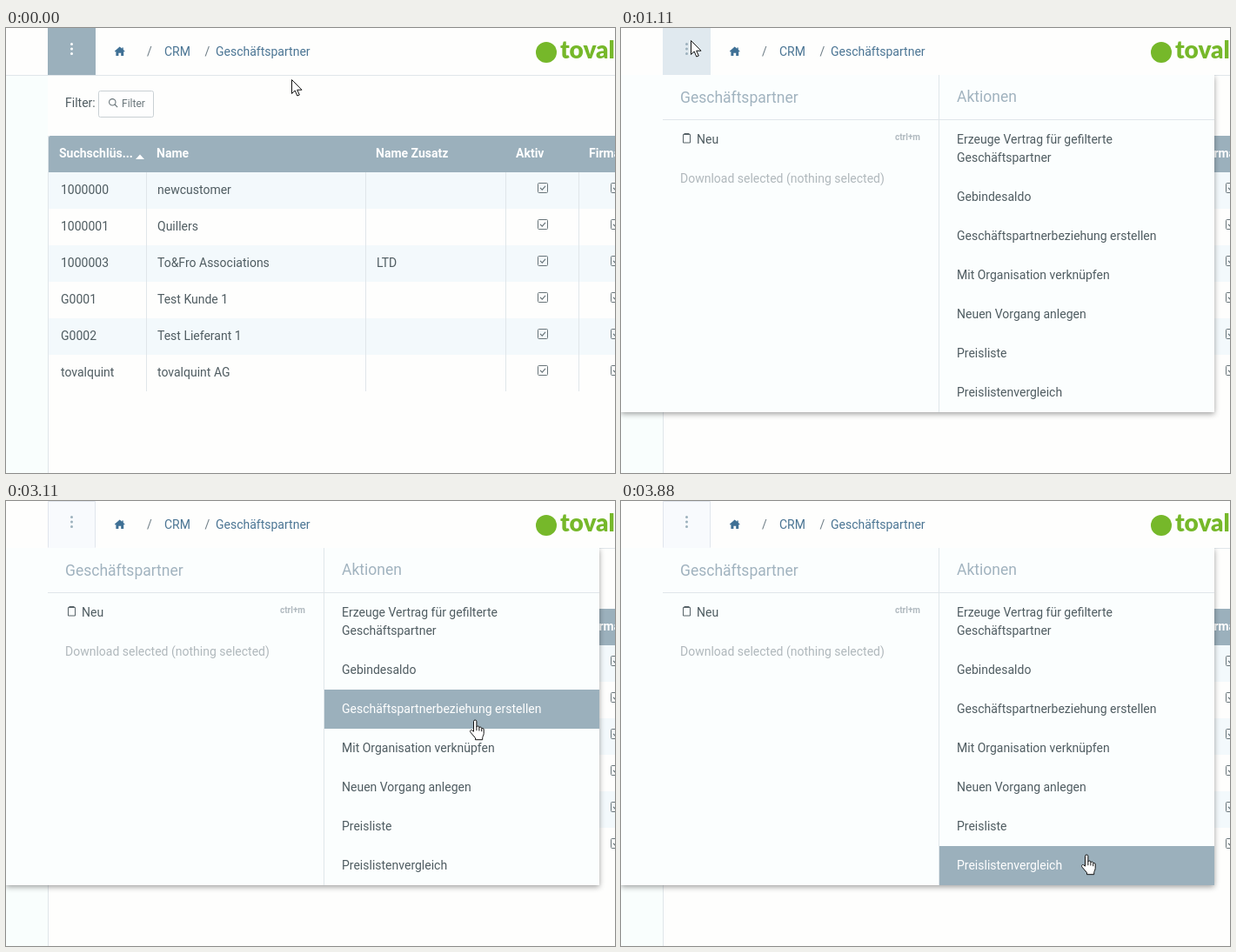
Write an HTML page that moves like this. It is 700x512 px and loops after 4000 ms.

```html
<!DOCTYPE html>
<html lang="de">
<head>
<meta charset="utf-8">
<title>Geschäftspartner</title>
<style>
html, body { margin: 0; width: 100%; height: 100%; overflow: hidden; background: #fefefd; }
svg { display: block; width: 100%; height: 100%; font: 14px Roboto, sans-serif; fill: #4f5c61; }
.line { fill: #e0e6ea; }
.th { fill: #fff; font-weight: 700; }
.crumb { fill: #4b7594; }
.title { fill: #a1b3bf; font-size: 17.5px; }
.brand { fill: #76b82a; font: 900 28px Lato, sans-serif; }
.thin { fill: none; stroke: #687479; }
.pointer { fill: #fff; stroke: #111; stroke-linejoin: round; }
rect { shape-rendering: crispEdges; }
</style>
</head>
<body>
<svg viewBox="0 0 700 512" preserveAspectRatio="none">
  <defs>
    <filter id="shadow" x="-5%" y="-5%" width="110%" height="112%">
      <feDropShadow dx="0" dy="2" stdDeviation="3" flood-color="#000" flood-opacity=".38"/>
    </filter>
    <clipPath id="below"><rect y="54" width="700" height="458"/></clipPath>
    <g id="check" class="thin">
      <rect x=".5" y=".5" width="11" height="11" rx="1" style="shape-rendering:auto"/>
      <path d="M3 5.8 5.3 8.2 9 3.8" stroke-width="1.2"/>
    </g>
  </defs>

  <rect width="700" height="512" fill="#fefefd"/>
  <rect y="55" width="48" height="457" fill="#f9fefd"/>
  <rect class="line" y="54" width="700" height="1"/>
  <rect class="line" x="48" y="124" width="1" height="388"/>

  <text x="68" y="91">Filter:</text>
  <rect x="106.5" y="72.5" width="63" height="30" rx="2" fill="#fefefe" stroke="#c9d0d4" style="shape-rendering:auto"/>
  <g class="thin" stroke-width="1.1"><circle cx="122.3" cy="85.3" r="3.7"/><path d="M125 88l3.2 3.2"/></g>
  <text x="133" y="91" font-size="12" fill="#6b777c">Filter</text>

  <g id="table"></g>

  <g id="menu">
    <g clip-path="url(#below)">
      <rect y="54" width="682" height="388" fill="#fbfefe" filter="url(#shadow)"/>
    </g>
    <rect class="line" x="48" y="105" width="634" height="1"/>
    <rect class="line" x="365" y="54" width="1" height="388"/>
    <text class="title" x="68" y="86">Geschäftspartner</text>
    <text class="title" x="386" y="85">Aktionen</text>
    <path id="star" fill="#9db1c0"/>
    <path class="thin" d="M71.5 122.5h8v9.5h-8zM72.5 121.5h6" style="stroke:#566267"/>
    <text x="87" y="133">Neu</text>
    <text x="315" y="129" font-size="10" font-weight="700" fill="#b1bac0">ctrl+m</text>
    <text x="68" y="178" fill="#b0b8bc">Download selected (nothing selected)</text>
    <g id="actions"></g>
  </g>

  <rect id="button" x="48" width="55" height="54"/>
  <path id="frame" d="M48.5 53.5V.5h54v53" fill="none" stroke="#e0e5ec"/>
  <g id="dots"><circle cx="75.5" cy="18.5" r="1.5"/><circle cx="75.5" cy="24" r="1.5"/><circle cx="75.5" cy="29.5" r="1.5"/></g>

  <path d="M130.7 21.5 125 26.6v.6h1.4V32h3v-3.3h2.8V32h3v-4.8h1.3v-.6l-1.7-1.5v-2.6h-1.4v1.3z" fill="#3f7095"/>
  <g fill="#6d7c85"><text x="162" y="32">/</text><text x="228.500" y="32">/</text></g>
  <text class="crumb" x="182" y="32">CRM</text>
  <text class="crumb" x="241" y="32">Geschäftspartner</text>
  <circle cx="621" cy="28" r="12" fill="#76b82a"/>
  <text class="brand" x="637" y="35">tovalquint</text>

  <path id="arrow" class="pointer" d="M.5.5V16.500l3.700-3.500 2.600 6 2.500-1-2.600-5.800H12z"/>
  <g id="hand" class="pointer">
    <path d="M5 14V2.500a1.700 1.700 0 0 1 3.400 0V9c0-1.600 2.800-1.600 3 0v.8c.2-1.400 2.700-1.200 2.800.4v.8c.4-1.200 2.500-1 2.500.8v4.500c0 2-1.500 3.500-1.500 5.200v2H7v-2L1.500 15c-1.400-2 .6-3.400 2-2.200z"/>
    <path d="M8.400 9v4M11.400 9.800v3.500M14.200 11v3" fill="none"/>
  </g>
</svg>
<script>
const $ = id => document.getElementById(id);
const rect = (x, y, w, h, attr) => `<rect x="${x}" y="${y}" width="${w}" height="${h}" ${attr}/>`;
const text = (x, y, s, attr = '') => `<text x="${x}" y="${y}" ${attr}>${s}</text>`;

const rows = [
  ['1000000', 'newcustomer'],
  ['1000001', 'Quillers'],
  ['1000003', 'To&amp;Fro Associations', 'LTD'],
  ['G0001', 'Test Kunde 1'],
  ['G0002', 'Test Lieferant 1'],
  ['tovalquint', 'tovalquint AG']
];
const heads = [[61, 'Suchschlüs...'], [173, 'Name'], [425, 'Name Zusatz'], [586, 'Aktiv'], [670, 'Firma']];
const cellX = [63, 174, 426];

function buildTable() {
  let out = '<path d="M49 166V126q0-2 2-2H700v42z" fill="#9bb0bc"/>';
  out += heads.map(([x, s]) => text(x, 149, s, 'class="th"')).join('');
  out += '<path d="M149 151l5-5.500 5 5.500z" fill="#fff"/>';
  rows.forEach((cells, i) => {
    const y = 166 + 42 * i;
    if (i % 2 === 0) out += rect(49, y, 651, 42, 'fill="#f3f9fc"');
    out += cells.map((s, j) => text(cellX[j], y + 25, s)).join('');
    out += [611, 695].map(x => `<use href="#check" x="${x}" y="${y + 12}"/>`).join('');
  });
  out += [161, 413, 574, 658].map(x => rect(x, 166, 1, 252, 'class="line"')).join('');
  $('table').innerHTML = out;
}

const actions = [
  ['Erzeuge Vertrag für gefilterte', 'Geschäftspartner'],
  ['Gebindesaldo'],
  ['Geschäftspartnerbeziehung erstellen'],
  ['Mit Organisation verknüpfen'],
  ['Neuen Vorgang anlegen'],
  ['Preisliste'],
  ['Preislistenvergleich']
];
const tops = actions.map((_, i) => i ? 127 + 45 * i : 106);
const bottoms = tops.map((_, i) => tops[i + 1] || 442);

function buildActions() {
  $('actions').innerHTML = actions.map((lines, i) => '<g>' +
    rect(366, tops[i], 316, bottoms[i] - tops[i], 'fill="#9bb0bc"') +
    lines.map((s, j) => text(386, tops[i] + 27 + 21 * j, s)).join('') + '</g>').join('');
}

function starPath(cx, cy, r) {
  const pts = Array.from({ length: 10 }, (_, i) => {
    const a = i * Math.PI / 5, d = i % 2 ? r * 0.45 : r;
    return (cx + d * Math.sin(a)).toFixed(1) + ' ' + (cy - d * Math.cos(a)).toFixed(1);
  });
  return 'M' + pts.join('L') + 'z';
}

const LOOP = 4000, TICKS = 36, OPEN = 9;
const linear = u => u;
const smooth = u => u * u * (3 - 2 * u);
const easeOut = u => 1 - (1 - u) * (1 - u);

// tick, x, y, easing towards this point
const path = [
  [0, 328, 59], [6, 80, 14, smooth], [10, 80, 14, linear], [15, 336, 71, smooth],
  [20, 487, 87, linear], [24, 543, 82, easeOut], [25, 543, 82, linear],
  [30, 537, 345, smooth], [35, 535, 407, smooth]
];
// tick, red, green, blue
const shades = [[4, 155, 176, 188], [6, 88, 120, 139], [8, 88, 120, 139], [9, 168, 187, 199], [10, 224, 233, 239], [11, 248, 250, 253]];

function sample(keys, k) {
  const i = keys.findIndex(p => p[0] >= k);
  if (i === 0) return keys[0].slice(1, 4);
  if (i < 0) return keys[keys.length - 1].slice(1, 4);
  const a = keys[i - 1], b = keys[i];
  const ease = typeof b[3] === 'function' ? b[3] : linear;
  const u = ease((k - a[0]) / (b[0] - a[0]));
  return [1, 2, 3].map(j => Math.round(a[j] + (b[j] - a[j]) * u));
}

// The screen is refreshed nine times a second, on whole centiseconds.
const tickStart = k => Math.floor(k * LOOP / TICKS / 10 + 1e-6) * 10;
function tickAt(t) {
  const k = Math.floor(t * TICKS / LOOP);
  return k + 1 < TICKS && t >= tickStart(k + 1) ? k + 1 : k;
}

const show = (el, on) => el.setAttribute('visibility', on ? 'visible' : 'hidden');

function draw(t) {
  const k = tickAt(t), open = k >= OPEN;
  const [x, y] = sample(path, k);
  const onTitle = open && x < 365 && y > 54 && y < 105;
  const onStar = onTitle && x > 315 && y > 66;
  let onAction = false;

  $('menu').style.display = open ? '' : 'none';
  show($('star'), onTitle);
  [...$('actions').children].forEach((g, i) => {
    const hot = open && x > 365 && y >= tops[i] && y < bottoms[i];
    onAction = onAction || hot;
    show(g.firstChild, hot);
    g.setAttribute('fill', hot ? '#fff' : '#4f5c61');
  });

  $('button').setAttribute('fill', `rgb(${sample(shades, k)})`);
  show($('frame'), k > 10);
  $('dots').setAttribute('fill', open ? '#9bb0bc' : '#fff');

  const hand = onStar || onAction;
  show($('arrow'), !hand);
  show($('hand'), hand);
  $('arrow').setAttribute('transform', `translate(${x} ${y})`);
  $('hand').setAttribute('transform', `translate(${x - 6.5} ${y - 0.8})`);
}

buildTable();
buildActions();
$('star').setAttribute('d', starPath(325.5, 78.5, 7.2));
draw(0);

const begin = performance.now();
function loop() {
  draw((performance.now() - begin) % LOOP);
  requestAnimationFrame(loop);
}
requestAnimationFrame(loop);
</script>
</body>
</html>
```
